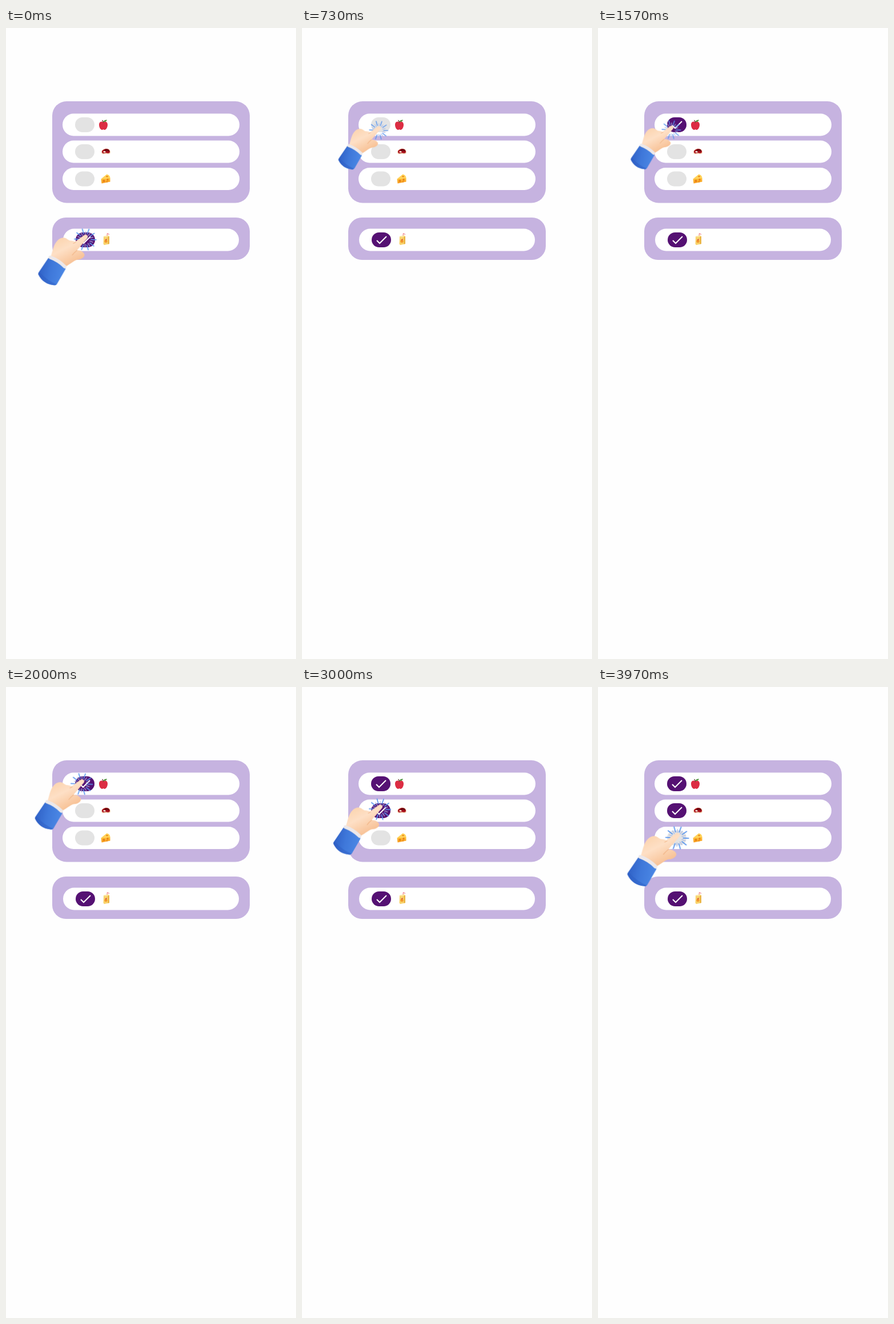
Recreate the animation shown at these times as an HTML page. Size 508 by 1102 pixels, loop 4010 ms.

```html
<!DOCTYPE html>
<html lang="en">
<head>
<meta charset="utf-8">
<title>Checklist</title>
<style>
  html, body { margin: 0; width: 100%; height: 100%; overflow: hidden; background: #fefefe; }
  svg { display: block; width: 100%; height: 100%; }
  .panel { fill: #c6b3e0; }
  .row { fill: #fff; }
  .off { fill: #e3e3e3; }
  .on { fill: #551173; }
  .tick { fill: none; stroke: #fff; stroke-width: 2; }

  .first { animation: check-first 4010ms step-end infinite; }
  .second { animation: check-second 4010ms step-end infinite; }
  @keyframes check-first { 0% { opacity: 0 } 24.86%, 100% { opacity: 1 } }
  @keyframes check-second { 0% { opacity: 0 } 74.56%, 100% { opacity: 1 } }

  /* The hand hops from toggle to toggle and pulses once per stop. */
  .place { animation: hop 4010ms step-end infinite; }
  @keyframes hop {
    0% { transform: translate(107px, 399.5px) }
    0.62% { transform: translate(107px, 204.5px) }
    24.86% { transform: translate(101px, 188.5px) }
    31.2% { transform: translate(101px, 188.5px); animation-timing-function: ease-in-out }
    39.9% { transform: translate(101px, 204px) }
    49.63% { transform: translate(101px, 199.5px) }
    50.5% { transform: translate(101px, 252px) }
    74.56% { transform: translate(105px, 243.5px) }
    75.44%, 100% { transform: translate(105px, 295.5px) }
  }
  .pulse { animation: pulse 1002.5ms linear -8ms infinite; }
  @keyframes pulse {
    0% { transform: scale(1) }
    6.5% { transform: scale(1.085) }
    13.5% { transform: scale(1.14) }
    19.7% { transform: scale(1.1) }
    35% { transform: scale(1.01) }
    53% { transform: scale(.89) }
    64% { transform: scale(.845) }
    73% { transform: scale(.86) }
    85% { transform: scale(.96) }
    97%, 100% { transform: scale(1.07) }
  }
</style>
</head>
<body>
<svg viewBox="0 0 508 1102">
  <defs>
    <linearGradient id="skin" x1=".1" y1="0" x2=".7" y2="1">
      <stop offset="0" stop-color="#fbd0a6"/>
      <stop offset=".45" stop-color="#fee0c6"/>
      <stop offset="1" stop-color="#f6b988"/>
    </linearGradient>
    <linearGradient id="sleeve" x1="0" y1=".4" x2="1" y2=".6">
      <stop offset="0" stop-color="#2f60c6"/>
      <stop offset=".45" stop-color="#3f78da"/>
      <stop offset="1" stop-color="#4c89e6"/>
    </linearGradient>
    <linearGradient id="cheese" x2="0" y2="1">
      <stop offset="0" stop-color="#ffc83d"/>
      <stop offset="1" stop-color="#f79a1f"/>
    </linearGradient>
    <rect id="pill" x="-17" y="-13" width="34" height="26" rx="13"/>
    <g id="checked">
      <use href="#pill" class="on"/>
      <path class="tick" d="M-8 1l5 5L9-6"/>
    </g>
    <rect id="row" x="99" y="-19.5" width="310" height="39" rx="19.5"/>
    <g id="rays" stroke-linecap="round"></g>
  </defs>

  <rect class="panel" x="81" y="128" width="346" height="177.5" rx="25"/>
  <rect class="panel" x="81" y="331" width="346" height="74" rx="24"/>
  <g class="row">
    <use href="#row" y="169"/>
    <use href="#row" y="216"/>
    <use href="#row" y="263.5"/>
    <rect x="100" y="350.5" width="308" height="39" rx="19.5"/>
  </g>
  <g class="off">
    <use href="#pill" x="138" y="169"/>
    <use href="#pill" x="138" y="216"/>
    <use href="#pill" x="138" y="263.5"/>
  </g>
  <use href="#checked" class="first" x="138" y="169"/>
  <use href="#checked" class="second" x="138" y="216"/>
  <use href="#checked" x="139" y="370"/>

  <!-- apple -->
  <g transform="translate(170.5 169)">
    <path fill="#dc2d43" d="M0-4.5C4-7 7.5-4.5 7.5 0 7.5 5 4.5 9 2 9 1 9 1 8.3 0 8.3S-1 9-2 9C-4.5 9-7.5 5-7.5 0-7.5-4.5-4-7 0-4.5Z"/>
    <path fill="none" stroke="#6b3a30" stroke-width="1.3" d="M0-3.5Q0-6-2-8"/>
    <path fill="#4f8f3c" d="M0-5Q1-9 6.5-8.5 5-4.5 0-5Z"/>
  </g>
  <!-- steak -->
  <g transform="translate(175 216)">
    <path fill="#f6dfc0" d="M-8 1C-8-3-3-5.5 1-5.5 6-5.5 8-2 8 1 8 4 5 4.5 3 4.3 0 4-2 4-4 4.5-6 5-8 3.5-8 1Z"/>
    <path fill="#a90f1b" d="M-7 0C-7-3-2-5 1-5 5-5 7-2 7 0 7 3 4 3 2 2.5 0 2-2 2-4 3-5.5 3.5-7 2-7 0Z"/>
    <path fill="#690912" d="M-3-3Q2-6 6-2.5L5 0Q2-3-1 0Z"/>
    <ellipse cx="-2.5" cy=".3" rx="2" ry="1.2" fill="#fff3e2"/>
  </g>
  <!-- cheese -->
  <g transform="translate(174.5 263.5)">
    <path fill="#ffd257" d="M-8 0L2-8Q7-7 8-2Z"/>
    <path fill="url(#cheese)" d="M-8 0L8-2V5L-7 8Z"/>
    <g fill="#e77d17">
      <circle cx="-3" cy="3.5" r="1.9"/>
      <circle cx="3.5" cy="1.5" r="1.7"/>
      <circle cx="2.5" cy="5" r="1.1"/>
      <ellipse cx="2.5" cy="-4.2" rx="1.8" ry="1.1"/>
    </g>
  </g>
  <!-- juice box -->
  <g transform="translate(176 370)">
    <path fill="none" stroke="#ef8b94" stroke-width="1.3" d="M1-7L1.5-11 5-9.5"/>
    <path fill="#f8d36b" d="M-5-6L3-8 5-6V7L-4 9-5.5 7Z"/>
    <path fill="#fbe6a4" d="M-5-6L3-8 5-6-3-4.5Z"/>
    <path fill="#e9b343" d="M2.5-5.5L5-6V7L2.5 7.6Z"/>
    <circle cx="-1" cy="2.5" r="2.5" fill="#f2952d"/>
    <path fill="#d94a3a" d="M-3 0L1-2 0 1Z"/>
  </g>

  <g class="place"><g class="pulse">
    <use href="#rays" x="31.5" y="-30"/>
    <path fill="url(#sleeve)" d="M-33 3Q-32 1-29 2L-5 17Q-2 19-3 22L-17 46Q-19 50-23 49-42 47-50 30-50 27-48 25Z"/>
    <path fill="#2c5cc0" opacity=".45" d="M-50 30Q-50 26-46 28-33 42-19 47-20 50-23 49-42 47-50 30Z"/>
    <path fill="url(#skin)" d="M-29 2C-26-6-25-13-22-20-18-28-13-33-6-33-1-33 1-29 5-28 9-28 11-27 14-26L29-37C33-40 38-36 35-32L17-11C22-12 29-8 30-4 31 0 25 5 18 5 12 6 8 11-3 17Z"/>
    <path fill="none" stroke="#eda56f" stroke-width="1.2" stroke-linecap="round" opacity=".6" d="M17-11Q12-7 9-3M11-23L15-25"/>
    <path fill="none" stroke="#ece8ea" stroke-width="6" stroke-linecap="round" d="M-29 1Q-15 6-4 17"/>
  </g></g>
</svg>
<script>
  // Ten long rays with a short, paler one between each pair.
  const ray = (angle, from, to, color, width) =>
    `<path d="M0 ${-from}V${-to}" transform="rotate(${angle})" stroke="${color}" stroke-width="${width}"/>`;
  document.getElementById('rays').innerHTML = Array.from({ length: 10 }, (_, i) =>
    ray(20 + 36 * i, 10, 18.7, '#5b97ee', 1.7) +
    ray(38 + 36 * i, 8, 14, '#a9b9e4', 1.2)).join('');
</script>
</body>
</html>
```
